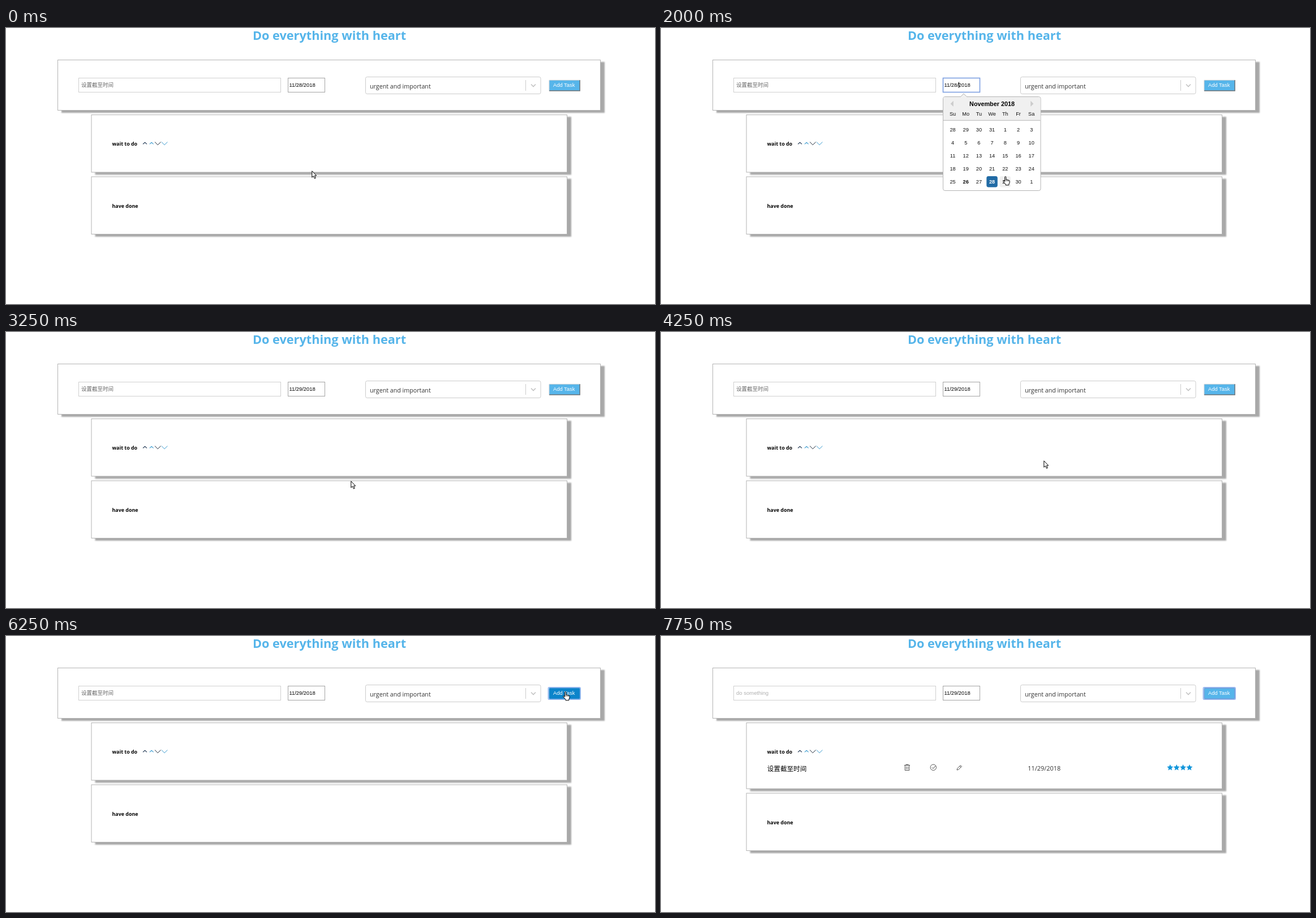
Recreate the animation shown at these times as an HTML page. Size 1147 px wide and 488 px high, loop 8.75 s.

```html
<!DOCTYPE html>
<html lang="zh-CN">
<head>
<meta charset="utf-8">
<title>Task list</title>
<style>
  html, body { margin: 0; width: 100%; height: 100%; overflow: hidden; background: #fff; }
  svg { display: block; width: 100%; height: 100%; }
  text { white-space: pre; }
  .ui { font-family: "Open Sans", "Noto Sans", sans-serif; }
  .form { font-family: "Liberation Sans", "Noto Sans CJK SC", "Noto Sans CJK", sans-serif; }
  .cjk { font-family: "Noto Sans CJK SC", "Noto Sans CJK", sans-serif; }
  .bold { font-weight: 700; }
  .mid { text-anchor: middle; }
</style>
</head>
<body>
<svg id="stage" viewBox="0 0 1147 488" preserveAspectRatio="none"></svg>
<script>
const LOOP = 8750;
const stage = document.getElementById('stage');

// Cursor: start time, shape, left, top
const MOVES = [
  [0, 'arrow', 540, 252], [250, 'arrow', 527, 137], [500, 'beam', 534, 106],
  [1000, '', 0, 0], [1250, 'beam', 537, 104], [1500, 'hand', 580, 219],
  [1750, 'hand', 600, 258], [2000, 'hand', 604, 262], [2250, 'hand', 608, 264],
  [2750, 'hand', 608, 265], [3250, 'arrow', 609, 263], [4250, 'arrow', 676, 227],
  [4500, 'arrow', 871, 149], [4750, 'arrow', 985, 102], [5000, 'hand', 988, 106],
  [5250, 'hand', 984, 98], [7250, 'arrow', 995, 118], [7500, 'arrow', 672, 409],
  [7750, '', 0, 0]
];

const SHAPES = {
  arrow: '<path d="M.8 .8V12.2L3.4 9.8L5.4 14.2L7.3 13.3L5.4 9.1H8.7Z" fill="#fff" stroke="#000" stroke-linejoin="round"/>',
  beam: '<path d="M.5 .5H2.5L3.5 1.5L4.5 .5H6.5M3.5 1.5V10.5M.5 11.5H2.5L3.5 10.5L4.5 11.5H6.5" fill="none" stroke="#222"/>',
  hand: '<path d="M3.6 9.5V1.8Q3.6 .6 4.7 .6T5.8 1.8V6Q7.6 5 8 6.6Q9.6 5.8 10 7.3Q12 6.8 12 8.6V11.2L10.8 14V15.8H5V14.2L1.2 9.8Q.3 8 1.8 7.9Z" fill="#fff" stroke="#000" stroke-linejoin="round"/><path d="M5.8 6V8.8M8 6.8V9M10 7.5V9.2" stroke="#000" stroke-width=".8"/>'
};

const rect = (x, y, w, h, fill, stroke = 'none', more = '') =>
  `<rect x="${x}" y="${y}" width="${w}" height="${h}" fill="${fill}" stroke="${stroke}" ${more}/>`;
const line = (d, stroke, width = 1) =>
  `<path d="${d}" fill="none" stroke="${stroke}" stroke-width="${width}"/>`;
const text = (x, y, size, str, cls = 'form', fill = '#000') =>
  `<text x="${x}" y="${y}" font-size="${size}" class="${cls}" fill="${fill}">${str}</text>`;

const panel = (x, y, w, h) =>
  rect(x + 7, y + 4, w, h, '#a8a8a8', 'none', 'filter="url(#soft)"') +
  rect(x + .5, y + .5, w - 1, h - 1, '#fff', '#b4b4b4');

function star(cx, cy) {
  let pts = '';
  for (let i = 0; i < 10; i++) {
    const a = i * Math.PI / 5, r = i % 2 ? 2.7 : 5.7;
    pts += `${cx + r * Math.sin(a)},${cy - r * Math.cos(a)} `;
  }
  return `<polygon points="${pts}" fill="#1296db"/>`;
}

function header() {
  return text(571.5, 21, 21.7, 'Do everything with heart', 'ui bold mid', '#56b5ea') +
    panel(91, 56, 960, 90);
}

function form(s) {
  let out = rect(128.5, 88.5, 357, 25, '#fff', '#d0d0d0');
  out += s.added
    ? text(133, 104, 9.5, 'do something', 'form', '#b0b0b0')
    : text(133, 104.3, 9.5, '设置截至时间', 'cjk', '#666');
  out += s.open
    ? rect(498.5, 88.5, 65, 25, '#fff', '#7c9fe0', 'stroke-width="1.6"')
    : rect(498.5, 88.5, 65, 25, '#fff', '#a4a4a4');
  out += text(500.5, 104.2, 9.4, s.date);
  if (s.caret) out += line('M526.5 95.5V106', '#000');
  out += rect(635.5, 86.5, 309.5, 30, '#fff', '#ccc', 'rx="2.8"') +
    text(643, 106.5, 10.7, 'urgent and important', 'ui', '#333') +
    line('M918.5 92V111', '#ccc') +
    line('M928 99.5L932 103.5L936 99.5', '#c4c4c4', 1.6);
  return out + button(s);
}

function button(s) {
  const fill = s.hover ? '#0b84cb' : '#56b5ea';
  let out = '';
  if (s.focus) out += rect(958.5, 91, 56.5, 21, 'none', '#9dbdf2', 'stroke-width="2" rx="1.5"');
  out += rect(960, 92, 54, 19, fill, 'none', 'rx="1.5"');
  out += s.focus
    ? rect(960, 92.2, 54, 18.8, 'none', s.hover ? '#3b8fd0' : '#6f8fd0', 'rx="1"')
    : line('M960 111V92.3H1014', '#c3cdd3') + line('M960 111H1014.2V92', '#6c7378', 1.4);
  return out + text(967, 104.2, 9.4, 'Add Task', 'form', '#fff');
}

function lists(s) {
  const grow = s.added ? 15 : 0;
  let out = panel(150.5, 153, 841.5, 102.5 + grow) + panel(150.5, 262.5 + grow, 841.5, 102.5) +
    text(187.5, 208.2, 8.9, 'wait to do', 'ui bold') +
    text(187.5, 317.6 + grow, 8.9, 'have done', 'ui bold') +
    line('M242 205.3L245.5 202.3L249 205.3', '#1d3450', 1.1) +
    line('M253.8 205.3L257.2 202.3L260.6 205.3', '#3a9bd0', 1.1) +
    line('M263 201.5L268.3 206.7L273.6 201.5', '#1d2838') +
    line('M274.8 201.5L280.1 206.7L285.4 201.5', '#3a9bd0');
  if (s.added) out += taskRow();
  return out;
}

function taskRow() {
  const ink = '#444';
  let out = text(187.7, 238.5, 11.6, '设置截至时间', 'cjk" font-weight="500');
  out += line('M430 228.5H440M433 228.3V227.2H437V228.3M431.2 228.5V237.5H438.8V228.5M433.6 230.5V235.8M436.4 230.5V235.8', ink, .9);
  out += `<circle cx="481.3" cy="232.3" r="5.2" fill="none" stroke="${ink}" stroke-width=".9"/>` +
    line('M478.8 232.3L480.8 234.3L486 229', ink);
  out += line('M523 237L523.8 234L529.5 228.6L531.5 230.6L525.8 236.2ZM528 230L530 232', ink, .9);
  out += text(648.3, 238.3, 10.9, '11/29/2018', 'ui', '#333');
  for (let i = 0; i < 4; i++) out += star(899.8 + i * 11.4, 232.8);
  return out;
}

function calendar(s) {
  const x0 = 515.5, y0 = 179.6, dx = 23.2, dy = 23.05;
  let out = rect(498.5, 121.5, 172.5, 166, '#fff', '#b4b4b4', 'rx="3.4"') +
    '<path d="M499 163V125Q499 122 502 122H667.5Q670.5 122 670.5 125V163Z" fill="#f0f0f0"/>' +
    line('M499 163.3H670.5', '#b4b4b4') +
    '<path d="M529 122L535 116L541 122" fill="#f0f0f0" stroke="#b4b4b4"/>' +
    '<path d="M516.8 128.7V139L511.6 133.9ZM653.2 128.7V139L658.4 133.9Z" fill="#ccc"/>' +
    text(585, 137.7, 10.8, 'November 2018', 'form bold mid');
  ['Su', 'Mo', 'Tu', 'We', 'Th', 'Fr', 'Sa'].forEach((d, i) => {
    out += text(x0 + i * dx, 155, 9.2, d, 'form mid', '#111');
  });
  for (let i = 0; i < 35; i++) {
    const day = i < 4 ? 28 + i : (i - 4) % 30 + 1;
    const x = x0 + i % 7 * dx, y = y0 + Math.floor(i / 7) * dy;
    const picked = i === 31, today = i === 29;
    if (picked || i === s.hot)
      out += rect(x - 9.8, y - 9.7, 19.5, 19.3, picked ? '#216ba5' : '#f0f0f0', 'none', 'rx="3.4"');
    out += text(x, y + 3.3, 9.2, day, 'form mid' + (picked || today ? ' bold' : ''), picked ? '#fff' : '#111');
  }
  return out;
}

function cursor(t) {
  const [, shape, x, y] = MOVES.filter(m => m[0] <= t).pop();
  return shape ? `<g transform="translate(${x} ${y})">${SHAPES[shape]}</g>` : '';
}

function stateAt(t) {
  const open = t >= 1000 && t < 3250;
  return {
    open,
    caret: open && Math.floor(t / 500) % 2 === 0,
    hot: t >= 1750 ? 32 : t >= 1500 ? 2 : -1,
    date: t < 3250 ? '11/28/2018' : '11/29/2018',
    hover: t >= 5000 && t < 7250,
    focus: t >= 6250,
    added: t >= 6500
  };
}

const DEFS = '<defs><filter id="soft" x="-5%" y="-15%" width="110%" height="130%"><feGaussianBlur stdDeviation="1"/></filter></defs>';

let shown = -1;
function draw(now) {
  const t = Math.floor(now % LOOP / 250) * 250;
  if (t !== shown) {
    const s = stateAt(t);
    stage.innerHTML = DEFS + header() + form(s) + lists(s) + (s.open ? calendar(s) : '') + cursor(t);
    shown = t;
  }
}

const start = performance.now();
function tick() {
  draw(performance.now() - start);
  requestAnimationFrame(tick);
}
tick();
</script>
</body>
</html>
```
